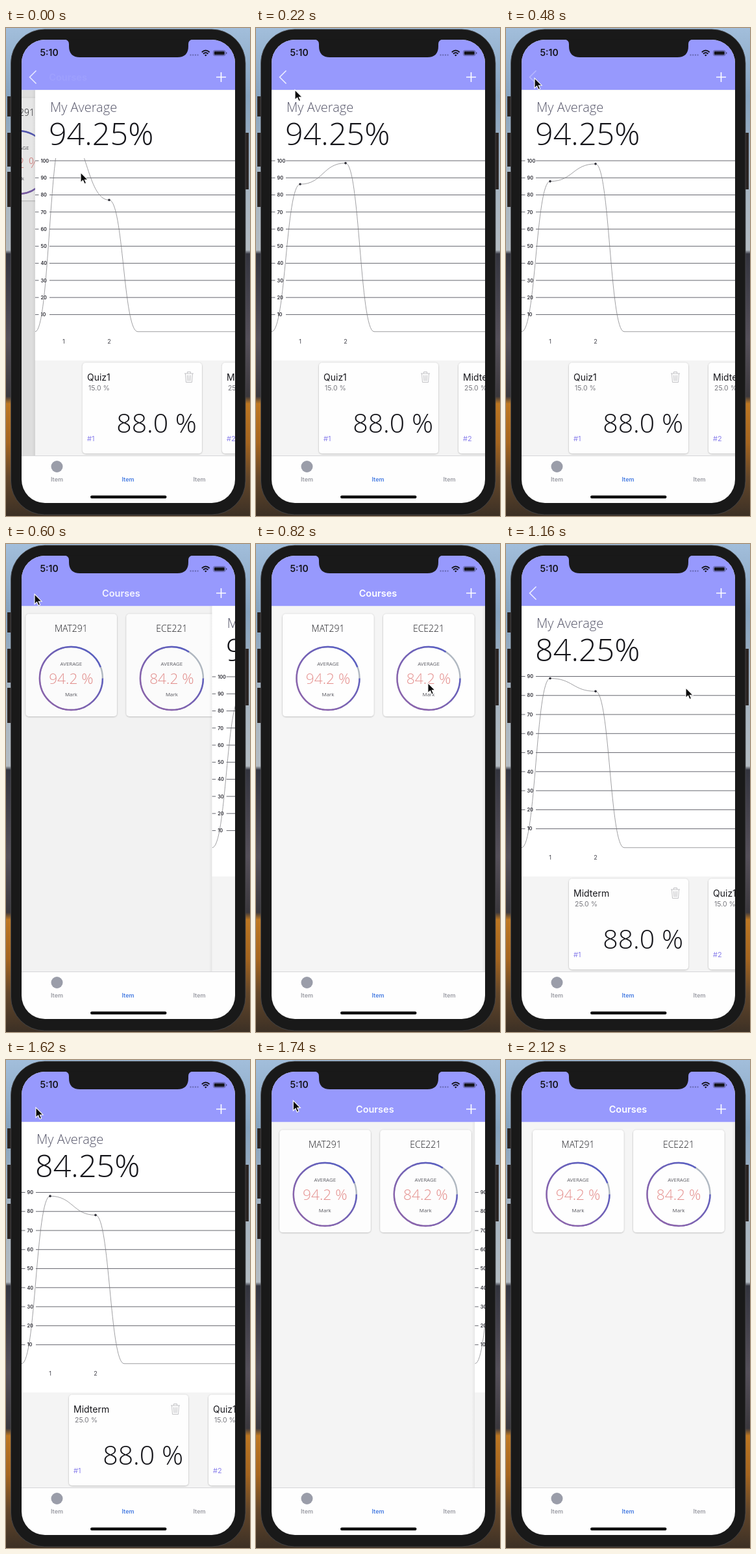
An HTML page that plays this animation: 376 px wide and 750 px high, repeating every 2140 ms.

```html
<!DOCTYPE html>
<html lang="en">
<head>
<meta charset="utf-8">
<title>Course averages</title>
<style>
  html, body { margin: 0; width: 100%; height: 100%; overflow: hidden; background: #191919; }
  svg { display: block; width: 376px; height: 750px; }
  text { font-family: Inter, "Liberation Sans", sans-serif; }
  .thin { font-family: "Open Sans", "Noto Sans", sans-serif; font-weight: 300; }
  .open { font-family: "Open Sans", "Noto Sans", sans-serif; }
  .mid { text-anchor: middle; }
  .end { text-anchor: end; }
  .bold { font-weight: 600; }
</style>
</head>
<body>
<svg viewBox="0 0 376 750" xmlns="http://www.w3.org/2000/svg">
  <defs>
    <linearGradient id="wall" x2="0" y2="1">
      <stop offset="0" stop-color="#a2bedb"/>
      <stop offset=".14" stop-color="#86a3bf"/>
      <stop offset=".3" stop-color="#a5b4c1"/>
      <stop offset=".455" stop-color="#b4bcc3"/>
      <stop offset=".463" stop-color="#34353f"/>
      <stop offset=".64" stop-color="#55505a"/>
      <stop offset=".755" stop-color="#3b383d"/>
      <stop offset=".77" stop-color="#bd7722"/>
      <stop offset=".85" stop-color="#a5651f"/>
      <stop offset=".92" stop-color="#64472a"/>
      <stop offset="1" stop-color="#3c3025"/>
    </linearGradient>
    <linearGradient id="ring" x1="0" y1="1" x2="1" y2="0">
      <stop offset=".25" stop-color="#8a63ae"/>
      <stop offset=".8" stop-color="#5c5fc2"/>
    </linearGradient>
    <linearGradient id="edge">
      <stop offset="0" stop-opacity="0"/>
      <stop offset="1" stop-opacity=".06"/>
    </linearGradient>
    <filter id="shade" x="-10%" y="-10%" width="120%" height="120%">
      <feDropShadow dx="0" dy=".5" stdDeviation="1.3" flood-opacity=".32"/>
    </filter>
    <clipPath id="screen"><rect x="24" y="18" width="329" height="712" rx="36"/></clipPath>
    <clipPath id="body"><rect x="24" y="95.5" width="329" height="562"/></clipPath>
    <clipPath id="plot"><rect y="200" width="329" height="300"/></clipPath>
  </defs>

  <rect width="376" height="750" fill="url(#wall)"/>
  <path d="M2 105h7v31h-7zM2 161h7v52h-7zM2 221h7v54h-7zM368 161h6v87h-6z" fill="#2b2523"/>
  <rect x="7.5" y="2" width="361.5" height="746" rx="52" fill="#191919" stroke="#4b4b4d" stroke-width=".8"/>

  <g clip-path="url(#screen)">
    <rect x="24" y="18" width="329" height="712" fill="#fefefe"/>
    <rect x="24" y="18" width="329" height="77.5" fill="#9799fd"/>
    <g clip-path="url(#body)">
      <rect x="24" y="95" width="329" height="563" fill="#f5f5f5"/>
      <g id="list"></g>
      <rect id="dim" x="24" y="95" width="329" height="563"/>
      <g id="detail">
        <rect x="-5" y="95" width="5" height="563" fill="url(#edge)"/>
        <rect y="95" width="329" height="563" fill="#f4f4f4"/>
        <rect y="95" width="329" height="416" fill="#fff"/>
      </g>
    </g>
    <text id="title" class="mid bold" x="188" y="81" font-size="14.5" fill="#fff">Courses</text>
    <path id="back" d="M46.5 65.500L36.500 75.500L46.500 85.500" fill="none" stroke="#f1f1ff" stroke-width="1.5"/>
    <path d="M324 75.500h15M331.500 68v15" stroke="#fff" stroke-width="1.6"/>

    <path d="M24 657.500h329" stroke="#d6d6d8"/>
    <circle cx="78.500" cy="674" r="9" fill="#9a9da9"/>
    <g class="mid bold" font-size="9" fill="#9b9ca4">
      <text x="78.500" y="697">Item</text>
      <text x="188" y="697" fill="#487de2">Item</text>
      <text x="298" y="697">Item</text>
    </g>
    <rect x="130" y="718.500" width="117.500" height="4.500" rx="2.250" fill="#0b0b0b"/>
  </g>

  <path d="M90 17.500Q97 18 97 25V28Q97 45 114 45H264Q281 45 281 28V25Q281 18 288 17.500Z" fill="#191919"/>
  <text x="52.500" y="43" font-size="14" class="bold" fill="#15151c">5:10</text>
  <path d="M283.500 41.500h13" stroke="#6567b0" stroke-width="2" stroke-dasharray="2 1.700"/>
  <g fill="none" stroke="#15151c" stroke-width="1.900">
    <path d="M301.800 37.200Q307.700 31.800 313.600 37.200M304 39.700Q307.700 36.200 311.400 39.700"/>
    <path d="M307.700 43.500l-1.800-2q1.800-1.500 3.600 0z" fill="#15151c" stroke="none"/>
    <rect x="319.500" y="34.500" width="18.500" height="8" rx="2.300" stroke="#4d4e82" stroke-width=".8"/>
    <rect x="320.800" y="35.800" width="15.900" height="5.400" rx="1.200" fill="#15151c" stroke="none"/>
    <path d="M339.700 37v3" stroke="#4d4e82" stroke-width="1.200"/>
  </g>
  <path id="cursor" d="M0 0V15.500L3.600 12.200L6 17.600L8.600 16.400L6.300 11.200H11Z" fill="#0a0a0a" stroke="#fff" stroke-width="1.100"/>
</svg>

<script>
const LOOP = 2140, WIDTH = 329, ZERO = 466.7;
const $ = id => document.getElementById(id);

function add(parent, tag, attrs, text) {
  const node = document.createElementNS("http://www.w3.org/2000/svg", tag);
  for (const key in attrs) node.setAttribute(key, attrs[key]);
  if (text !== undefined) node.textContent = text;
  parent.appendChild(node);
  return node;
}

const label = (parent, text, x, y, size, fill, cls = "") =>
  add(parent, "text", { x, y, "font-size": size, fill, class: cls }, text);

const card = (parent, x, y, width, height) =>
  add(parent, "rect", { x, y, width, height, rx: 5, fill: "#fefefe", filter: "url(#shade)" });

function courseCard(x, code, mark) {
  const g = add($("list"), "g", { transform: `translate(${x})` });
  card(g, 0, 107.5, 140.5, 157.5);
  label(g, code, 70, 134.5, 14, "#17171c", "thin mid");
  const circle = { cx: 70, cy: 206.5, r: 48.5, fill: "none", "stroke-width": 2.4 };
  add(g, "circle", { ...circle, stroke: "#b1b9c2" });
  add(g, "circle", { ...circle, stroke: "url(#ring)", pathLength: 100, "stroke-dasharray": `${mark} 100` });
  label(g, "AVERAGE", 70, 187, 7.9, "#5d5d64", "open mid");
  label(g, mark + " %", 70, 215, 22.7, "#e5918f", "thin mid");
  label(g, "Mark", 70, 234, 7.9, "#55555c", "open mid");
}

function gradeCard(g, x, order, name, weight, mark) {
  card(g, x, 514.5, 184, 139.5);
  label(g, name, x + 7, 542, 14, "#17171c");
  label(g, weight, x + 9, 557, 10.5, "#77777d");
  label(g, "#" + order, x + 7, 635, 11, "#8b80ec");
  label(g, mark, x + 176, 621.5, 41, "#15151a", "thin end");
  add(g, "path", {
    transform: `translate(${x + 157} 528)`, fill: "none", stroke: "#c3c3c6",
    d: "M0 3H14M4.500 3V.5H9.500V3M1.500 3L2.500 16.500H11.500L12.500 3M4.500 5.500L5 14.500M7 5.500V14.500M9.500 5.500L9 14.500"
  });
}

function coursePage({ average, top, first, step, values, grades }) {
  const g = add($("detail"), "g", {});
  label(g, "My Average", 23, 129, 20, "#56566a", "thin");
  label(g, average, 21, 180, 48.5, "#15151a", "thin");
  for (let value = top, y = first; value > 0; value -= 10, y += step) {
    add(g, "path", { d: `M0 ${y}H5.500M22 ${y}H${WIDTH}`, stroke: "#55565f", "stroke-width": .9 });
    label(g, value, 8.5, y + 2.7, 7.3, "#2c2c34", "bold");
  }
  label(g, 1, 44, 484.5, 9, "#44444c", "mid");
  label(g, 2, 114, 484.5, 9, "#44444c", "mid");
  const plot = add(g, "g", { "clip-path": "url(#plot)" });
  const curve = add(plot, "path", { fill: "none", stroke: "#77777c", "stroke-width": .7 });
  const dots = [44, 114].map(cx => add(plot, "circle", { cx, r: 1.8, fill: "#303039" }));
  grades.forEach((grade, i) => gradeCard(g, 73 + 215 * i, i + 1, ...grade));

  return {
    show(visible) { g.style.display = visible ? "" : "none"; },
    draw(age) {
      const [a, b] = values.map((v, i) => ZERO - v * step / 10 * bounce(age - 50 * i));
      curve.setAttribute("d", `M0 ${ZERO}C22 ${ZERO} 22 ${a} 44 ${a}C79 ${a} 79 ${b} 114 ${b}` +
        `C136 ${b} 136 ${ZERO} 158 ${ZERO}H${WIDTH}`);
      dots[0].setAttribute("cy", a);
      dots[1].setAttribute("cy", b);
    }
  };
}

// Underdamped spring from 0 to 1, first peak after 72 ms.
function bounce(age) {
  if (age <= 0) return 0;
  const angle = Math.PI * age / 72, damping = .29;
  return 1 - Math.exp(-damping * angle) * (Math.cos(angle) + damping * Math.sin(angle));
}

// Critically damped slide from 0 to 1.
function slide(age) {
  const k = Math.max(0, age) * .05;
  return 1 - (1 + k) * Math.exp(-k);
}

const clamp = v => Math.min(1, Math.max(0, v));
const smooth = v => v * v * (3 - 2 * v);

const quiz = ["Quiz1", "15.0 %", "88.0 %"], midterm = ["Midterm", "25.0 %", "88.0 %"];
courseCard(41, "MAT291", 94.2);
courseCard(196, "ECE221", 84.2);

const visits = [
  { push: -88, pop: 525, page: coursePage({
    average: "94.25%", top: 100, first: 204, step: 26.27, values: [88, 98], grades: [quiz, midterm] }) },
  { push: 904, pop: 1645, page: coursePage({
    average: "84.25%", top: 90, first: 203.5, step: 29.27, values: [88, 78], grades: [midterm, quiz] }) }
];

const cursorPath = [
  [0, 115, 222], [90, 115, 222], [220, 60, 95], [300, 44, 77], [640, 44, 77], [850, 277, 221],
  [1250, 277, 221], [1500, 46, 73], [1700, 46, 73], [1900, 150, -25], [LOOP, 150, -25]
];

function cursorAt(t) {
  const i = cursorPath.findIndex(key => key[0] > t);
  const [t0, x0, y0] = cursorPath[i - 1], [t1, x1, y1] = cursorPath[i];
  const p = smooth((t - t0) / (t1 - t0));
  return [x0 + (x1 - x0) * p, y0 + (y1 - y0) * p];
}

function render(t) {
  const visit = visits[t < visits[1].push ? 0 : 1];
  const open = t < visit.pop ? slide(t - visit.push) : 1 - slide(t - visit.pop);
  const parallax = `translate(${-.3 * WIDTH * open})`;
  visits.forEach(v => v.page.show(v === visit));
  visit.page.draw(t - visit.push - 4);

  $("detail").setAttribute("transform", `translate(${24 + WIDTH * (1 - open)})`);
  $("list").setAttribute("transform", parallax);
  $("dim").setAttribute("opacity", .1 * open);
  $("title").setAttribute("transform", parallax);
  $("title").setAttribute("opacity", 1 - open);
  $("back").setAttribute("opacity", open * clamp((visit.pop - 30 - t) / 40));
  $("cursor").setAttribute("transform", `translate(${cursorAt(t)})`);
}

function tick() {
  render(performance.now() % LOOP);
  requestAnimationFrame(tick);
}
tick();
</script>
</body>
</html>
```
